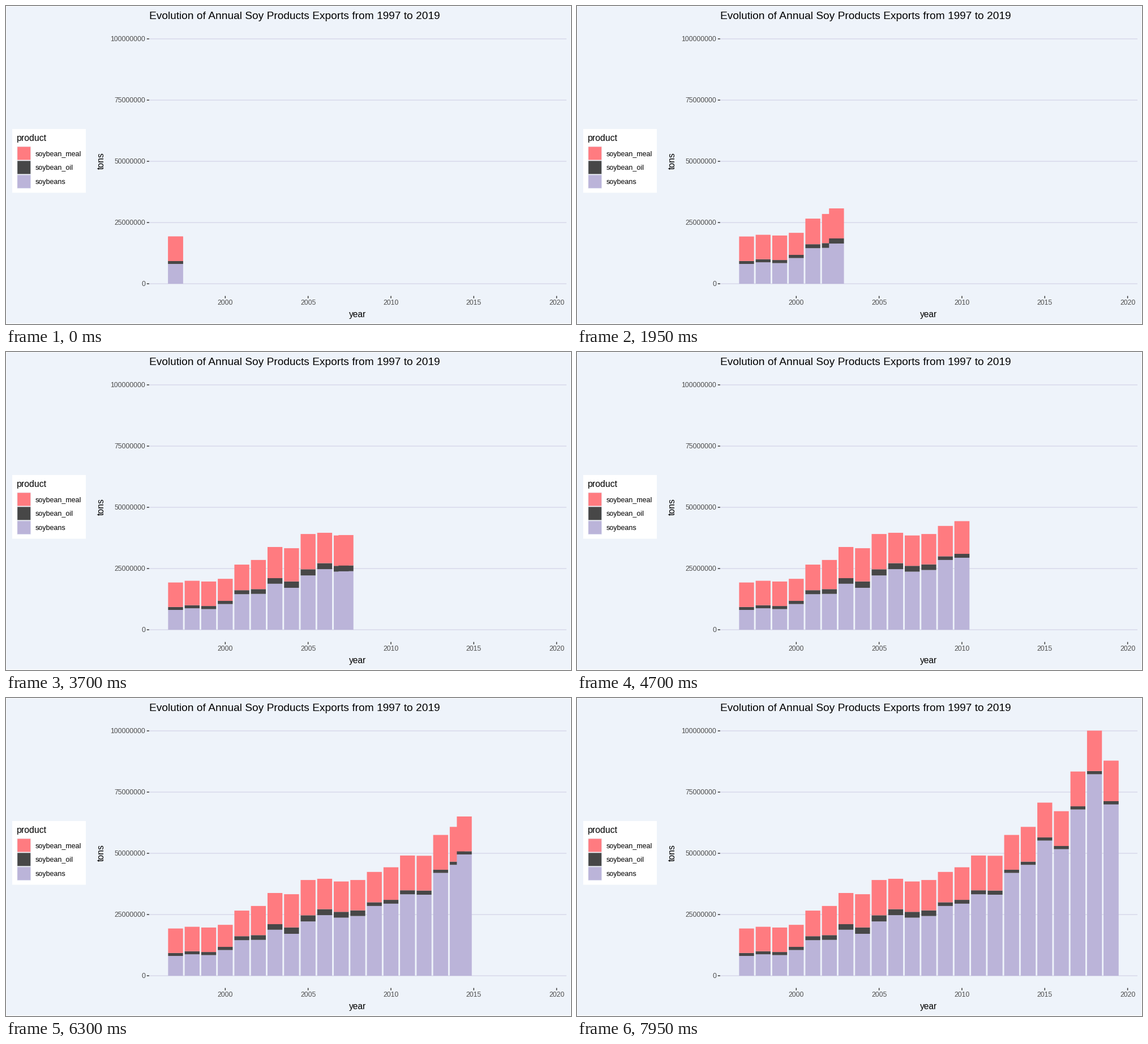
A matplotlib script that plays this animation: 998 by 561 pixels, repeating every 10000 ms.

```python
import matplotlib.pyplot as plt
import numpy as np
from matplotlib.animation import FuncAnimation
from matplotlib.patches import Rectangle

W, H, DPI = 998, 561, 100
FRAMES, INTERVAL, LAST = 200, 50, 159
BG, GRID, TICK, LABEL = "#eef3fa", "#d8d9eb", "#333333", "#4d4d4d"
MEAL, OIL, BEANS = "#ff7b80", "#474747", "#bbb4d9"
FIRST_YEAR, BAR_W, YEAR_W, TON_H = 1997, 26.34, 29.265, 4.32

# Yearly totals in million tons; meal and oil shares run through a few key years
TOTAL = np.array([19.3, 20, 19.7, 20.8, 26.6, 28.5, 33.8, 33.3, 39.1, 39.6, 38.5, 39.1,
                  42.4, 44.3, 49.1, 49, 57.5, 60.8, 70.7, 67.2, 83.4, 100.1, 87.8])
STEPS = len(TOTAL) - 1
index = np.arange(STEPS + 1)
meal = np.interp(index, [0, 2, 3, 5, 8, 9, 12, 14, 20, 21],
                 [10, 10, 9, 11.9, 14.4, 12.4, 12.4, 14.2, 14.2, 16.5])
oil = np.interp(index, [0, 3, 7, 11, 12, 15, 16], [1.2, 1.3, 2.6, 2.3, 1.5, 1.7, 1.3])
TOPS = np.column_stack([TOTAL - meal - oil, TOTAL - meal, TOTAL])

# Every year falls on a whole frame
KEYS = np.round(1 + index * LAST / STEPS).astype(int) - 1

plt.rcParams["font.family"] = "Liberation Sans"
fig = plt.figure(figsize=(W / DPI, H / DPI), dpi=DPI, facecolor="white")
ax = fig.add_axes([0, 0, 1, 1])
ax.set(xlim=(0, W), ylim=(H, 0))
ax.axis("off")


def x_of(year):
    return 387.3 + (year - 2000) * YEAR_W


def y_of(tons):
    return 490 - tons * TON_H


def rect(x, y, w, h, color, z=1):
    return ax.add_patch(Rectangle((x, y), w, h, fc=color, lw=0, zorder=z, snap=False))


def text(x, y, s, px, color="black", ha="left", **kw):
    ax.text(x, y, s, size=px * 72 / DPI, color=color, ha=ha, va="baseline", **kw)


def make_bar(z):
    return [rect(0, 0, BAR_W, 0, color, z) for color in (BEANS, OIL, MEAL)]


def place_bar(bar, pos, tops):
    left = x_of(FIRST_YEAR + pos) - BAR_W / 2
    for part, base, top in zip(bar, [0, *tops], tops):
        part.set_bounds(left, y_of(top), BAR_W, (top - base) * TON_H)


def draw_axes():
    text(252.8, 23, "Evolution of Annual Soy Products Exports from 1997 to 2019", 19.2)
    for tons in range(0, 101, 25):
        y = y_of(tons)
        rect(252.8, y - 0.75, 737.2, 1.5, GRID)
        rect(248.8, y - 0.75, 4, 1.5, TICK)
        text(246, y + 4.4, str(tons * 10**6), 12.15, LABEL, "right")
    for year in range(2000, 2021, 5):
        x = x_of(year)
        rect(x - 0.75, 511.6, 1.5, 4, TICK)
        text(x, 527.4, str(year), 12.15, LABEL, "center")
    text(621.4, 549, "year", 15.5, ha="center")
    text(172.5, 273.5, "tons", 15.8, ha="center", rotation=90, rotation_mode="anchor")


def draw_legend():
    rect(11, 217, 130, 112.5, "white")
    text(19, 238, "product", 15.9)
    items = [(MEAL, "soybean_meal"), (OIL, "soybean_oil"), (BEANS, "soybeans")]
    for i, (color, name) in enumerate(items):
        y = 247.5 + 24.9 * i
        rect(19.3, y, 24.9, 24.9, BG, 2)
        rect(20.2, y + 0.9, 23.1, 23.1, color, 3)
        text(52, y + 17, name, 12.55)


rect(0.8, 0.8, W - 1.8, H - 2, BG, 0)
draw_axes()
draw_legend()
still = [make_bar(4) for _ in TOPS]
for i, tops in enumerate(TOPS):
    place_bar(still[i], i, tops)
moving = make_bar(5)


def update(frame):
    pos = np.interp(frame, KEYS, index)
    place_bar(moving, pos, [np.interp(pos, index, column) for column in TOPS.T])
    for key, bar in zip(KEYS, still):
        for part in bar:
            part.set_visible(key <= frame)
    return moving + sum(still, [])


anim = FuncAnimation(fig, update, frames=FRAMES, interval=INTERVAL,
                     init_func=lambda: update(0), repeat=True, repeat_delay=0)
plt.show()
```
